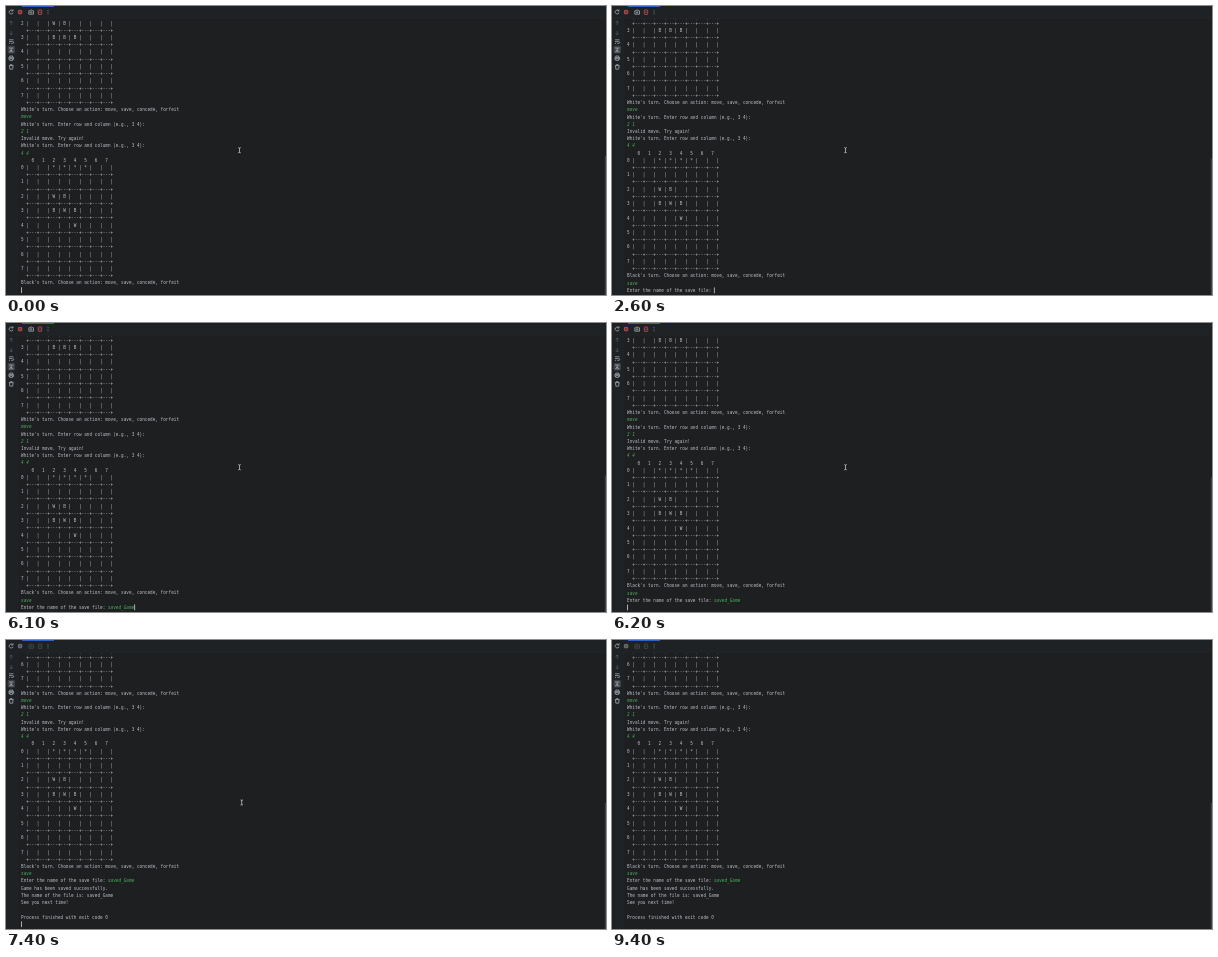
An HTML page that plays this animation: 600x289 px, repeating every 9500 ms.

```html
<!DOCTYPE html>
<html lang="en">
<head>
<meta charset="utf-8">
<title>Console game</title>
<style>
html, body { margin: 0; width: 100%; height: 100%; overflow: hidden; background: #1d1f21; }
#stage { position: absolute; left: 0; top: 0; width: 600px; height: 289px; overflow: hidden; }
#view { position: absolute; left: 0; top: 12.5px; width: 600px; bottom: 0; overflow: hidden; }
/* laid out ten times too large so that tiny glyphs keep exact advances */
#console {
  position: absolute; left: 15px; bottom: 1.3px; margin: 0;
  font: 43.75px/72.15px "DejaVu Sans Mono", monospace; color: #bcbec4;
  transform: scale(.1); transform-origin: 0 100%;
}
#console b { font-weight: normal; font-style: italic; color: #4fae5c; }
#caret { position: absolute; bottom: 7px; width: 8px; height: 58px; background: #ced0d6; }
svg { position: absolute; left: 0; top: 0; }
</style>
</head>
<body>
<div id="stage">
  <div id="view"><pre id="console"><span id="text"></span><span id="caret"></span></pre></div>
  <svg width="600" height="289" fill="none" stroke="#b4b8bf" stroke-width=".7">
    <g stroke="none">
      <path fill="#1f2225" d="M0 0H600V12H12V289H0Z"/>
      <path fill="#292b2e" d="M0 11.8H600V12.3H0ZM11.8 12H12.2V289H11.8Z"/>
      <path fill="#3574f0" d="M16 0H48V.8H16Z"/>
      <rect fill="#3c3f43" x="1.5" y="39.8" width="7.5" height="7.8" rx="1.5"/>
      <rect id="thumb" fill="#404245" x="598.8" width="1.2" height="140"/>
    </g>
    <path d="M6.6 4.6A2 2 0 1 0 7.1 6.6M7 3.4V5H5.4"/>
    <rect id="stop" x="12.4" y="4.4" width="3.4" height="3.4" rx=".5"/>
    <g id="tools">
      <path d="M22.8 4.8H24L24.5 4H26L26.5 4.8H27.5V8.2H22.8Z"/>
      <circle cx="25.1" cy="6.4" r=".8"/>
    </g>
    <g id="exit"><rect x="32.3" y="4" width="3.4" height="4.4" rx=".5"/><path d="M33.2 6.2H34.8"/></g>
    <path d="M42 4V8.4" stroke-dasharray=".7 1.1"/>
    <g stroke="#5a5d63"><path d="M5.2 19V15M3.7 16.5L5.2 15 6.7 16.5M5.2 25V29M3.7 27.5L5.2 29 6.7 27.5"/></g>
    <path d="M3 33.8H7.5M3 35.6H6.6Q7.7 35.6 7.7 36.5T6.6 37.4H5.2M3 37.4H4"/>
    <path d="M3 42H7.5M3 45.8H7.5M5.2 42V45M4 43.8L5.2 45 6.4 43.8"/>
    <path d="M3.8 51.4V50H6.7V51.4M3.8 53.4H2.9V51.4H7.6V53.4H6.7M3.8 52.6H6.7V54.4H3.8Z"/>
    <path d="M2.9 59.6H7.6M4.4 59.4V58.6H6.1V59.4M3.5 59.8L3.8 63.2H6.7L7 59.8"/>
    <path id="mouse" d="M-1.2 -2.6Q0 -2.6 0 -1.8Q0 -2.6 1.2 -2.6M0 -2V2M-1.2 2.6Q0 2.6 0 1.8Q0 2.6 1.2 2.6" stroke="#d8d8d8"/>
  </svg>
</div>
<script>
const $ = id => document.getElementById(id);
const LOOP = 9500, STEP = 100;

function board(rows) {
  const rule = '  ' + '+---'.repeat(8) + '+\n';
  let out = '    0   1   2   3   4   5   6   7\n';
  for (let r = 0; r < 8; r++) {
    const cells = [...(rows[r] || '').padEnd(8)].map(c => `| ${c} `).join('');
    out += `${r} ${cells}|\n${rule}`;
  }
  return out;
}

const typed = s => `<b>${s}</b>`;
const choose = who => `${who}'s turn. Choose an action: move, save, concede, forfeit\n`;
const ask = "White's turn. Enter row and column (e.g., 3 4):\n";

const start = board({ 2: '  WB', 3: '  BBB' }) + choose('White') + typed('move') + '\n' +
  ask + typed('2 1') + '\nInvalid move. Try again!\n' + ask + typed('4 4') + '\n' +
  board({ 0: '  ****', 2: '  WB', 3: '  BWB', 4: '    W' }) + choose('Black');
const saving = start + typed('save') + '\n';
const prompt = saving + 'Enter the name of the save file: ';
const named = prompt + typed('saved_Game') + '\n';
const done = named + 'Game has been saved successfully.\nThe name of the file is: saved_Game\n' +
  'See you next time!\n\nProcess finished with exit code 0\n';

// [time, value] lists: the last entry reached holds
const texts = [
  [0, start], [100, start + typed('sa')], [200, start + typed('save')], [500, saving], [1500, prompt],
  ...[...'saved'].map((_, i) => [4100 + i * 100, prompt + typed('saved'.slice(0, i + 1))]),
  [5000, prompt + typed('saved_G')], [6100, prompt + typed('saved_Game')], [6200, named], [7000, done]
];
const blinks = [[0, 1], [2000, 0], [2600, 1], [3200, 0], [3600, 1], [7800, 0], [8400, 1], [9000, 0]];
const thumbs = [[0, 150], [500, 152.5], [6200, 154.5], [7000, 163]];
const path = [[0, 233.5, 144.2], [6900, 233.5, 144.2], [7400, 235.7, 162.5], [7500, 235.7, 162.5],
  [7800, 234.5, 167], [7900, 234.5, 167], [8900, 278, 293]];

const at = (list, t) => list.filter(e => e[0] <= t).pop()[1];

function mouseAt(t) {
  const i = path.findIndex(p => p[0] > t);
  if (i < 0) return path[path.length - 1].slice(1);
  const a = path[i - 1], b = path[i], k = (t - a[0]) / (b[0] - a[0]);
  return [1, 2].map(j => a[j] + (b[j] - a[j]) * k);
}

let shown;
function draw(t) {
  const text = at(texts, t), running = t < 7000;
  if (text !== shown) {
    shown = text;
    $('text').innerHTML = text + ' ';
    $('caret').style.left = text.split('\n').pop().replace(/<.*?>/g, '').length + 'ch';
  }
  $('caret').style.opacity = at(blinks, t);
  $('thumb').setAttribute('y', at(thumbs, t));
  $('stop').setAttribute('stroke', running ? '#db5c5c' : '#85888e');
  $('stop').setAttribute('fill', running ? '#7a3336' : '#55585d');
  $('tools').setAttribute('stroke', running ? '#b4b8bf' : '#4e5157');
  $('exit').setAttribute('stroke', running ? '#db5c5c' : '#4e5157');
  $('mouse').setAttribute('transform', `translate(${mouseAt(t)})`);
}

const origin = performance.now();
function tick() {
  const t = (performance.now() - origin) % LOOP;
  draw(Math.floor(t / STEP) * STEP);
  requestAnimationFrame(tick);
}
tick();
</script>
</body>
</html>
```
